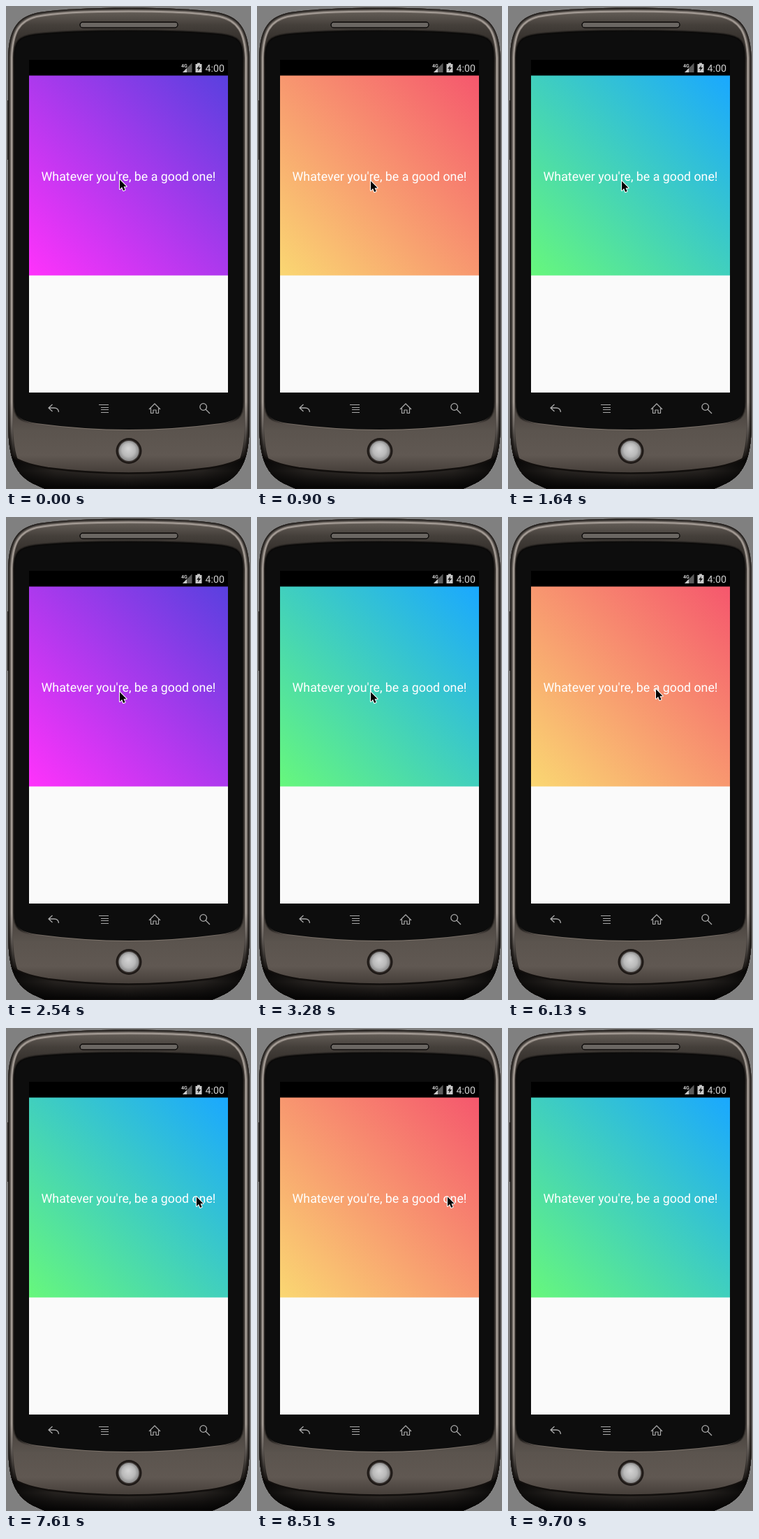
Recreate the animation shown at these times as an HTML page with a canvas. Size 351 by 691 pixels, loop 9990 ms.

```html
<!DOCTYPE html>
<html lang="en">
<head>
<meta charset="utf-8">
<title>Gradient tap</title>
<style>
  html, body { margin: 0; width: 100%; height: 100%; overflow: hidden; background: #808080; }
  canvas { display: block; width: 351px; height: 691px; }
</style>
</head>
<body>
<canvas id="stage" width="351" height="691"></canvas>
<script>
const W = 351, H = 691, LOOP = 9990;
const ctx = document.getElementById('stage').getContext('2d');

const palettes = {
  purple: ['#ff32fb', '#5940df'],
  green: ['#67f77c', '#1aa8ff'],
  orange: ['#fad772', '#f5576d']
};

// [start ms, palette]
const taps = [
  [0, 'purple'], [600, 'green'], [900, 'orange'], [1040, 'purple'], [1640, 'green'],
  [2090, 'orange'], [2240, 'green'], [2540, 'purple'], [3280, 'green'], [4480, 'purple'],
  [5680, 'green'], [5830, 'purple'], [6130, 'orange'], [6280, 'green'], [6430, 'purple'],
  [7610, 'green'], [8510, 'orange'], [8660, 'purple'], [8950, 'green']
];

// [start ms, tip x, tip y]
const pointer = [
  [0, 162, 247], [600, 162, 249], [4930, 162, 247], [5380, 162, 246], [5680, 168, 246],
  [5830, 190, 246], [6130, 211, 245], [6280, 224, 246], [6430, 237, 246], [6720, 247, 247],
  [6870, 258, 246], [7320, 272, 240], [8950, 274, 254], [9100, 281, 310], [9250, 294, 410],
  [9400, 308, 545], [9550, 319, 672], [9700, 400, 800]
];

const at = (track, t) => track.findLast(key => key[0] <= t);

function ramp(c, x0, y0, x1, y1, colors) {
  const g = c.createLinearGradient(x0, y0, x1, y1);
  colors.forEach((color, i) => Array.isArray(color)
    ? g.addColorStop(color[0], color[1])
    : g.addColorStop(i / (colors.length - 1), color));
  return g;
}

function stroke(c, path, color, width) {
  c.strokeStyle = color;
  c.lineWidth = width;
  c.stroke(new Path2D(path));
}

const BODY = 'M3 74C4 36 14 17 43 10C92 0 260 0 307 10C337 17 347 36 349 74' +
  'L349 600C348 645 340 672 306 686Q298 690 288 693L63 693Q53 690 45 686C11 672 4 645 3 600Z';
const GLASS = 'M13 74C13 52 18 45 42 42C105 35 246 35 309 42C333 45 338 52 338 74' +
  'L338 566C338 588 331 593 307 597Q240 606 176 606Q111 606 44 597C20 593 13 588 13 566Z';
const LIP = 'M0 636Q14 654 60 661Q176 676 291 661Q337 654 351 636V691H0Z';

function drawShell(c) {
  c.fillStyle = '#808080';
  c.fillRect(0, 0, W, H);
  c.fillStyle = '#252220';
  c.fillRect(2, 135, 3, 85);

  const body = new Path2D(BODY);
  c.save();
  c.clip(body);
  c.fillStyle = ramp(c, 0, 0, 0, H, [[0, '#6e6761'], [.02, '#5a544e'], [.04, '#443f3a'],
    [.065, '#37322e'], [.15, '#4b4540'], [.84, '#4b4540'], [.88, '#5b544e'],
    [.93, '#605852'], [.965, '#463f3a']]);
  c.fillRect(0, 0, W, H);

  // Rounded metal edge, painted from the inside out.
  const rim = ['#24211f', '#34302d', '#4b4642', '#6f6862', '#9a928c', '#aaa29b', '#7c746e'];
  for (let i = rim.length; i > 0; i--) {
    const color = rim[i - 1];
    stroke(c, BODY, ramp(c, 0, 0, 0, H, [[0, color], [.82, color], [.94, '#14110f']]), i * 2);
  }

  const lip = new Path2D(LIP);
  c.fillStyle = ramp(c, 0, 640, 0, 690, ['#14110f', '#2b2724', '#37322e', '#1c1917', '#070606']);
  c.fill(lip);
  c.fillStyle = ramp(c, 0, 0, W, 0, [[0, '#000d'], [.2, '#0005'], [.5, '#0000'], [.8, '#0005'], [1, '#000d']]);
  c.fill(lip);
  stroke(c, LIP, '#120f0d', 2.5);
  c.restore();

  [[7, '#0003'], [5, '#0006'], [3, '#000a']].forEach(([width, color]) => {
    stroke(c, GLASS, ramp(c, 0, 590, 0, 598, [color, '#0000']), width);
  });
  stroke(c, GLASS, ramp(c, 0, 585, 0, 606, ['#83797000', '#837970']), 2);
  c.fillStyle = '#0d0d0d';
  c.fill(new Path2D(GLASS));
}

function drawSpeaker(c) {
  c.save();
  c.beginPath();
  c.roundRect(106, 23, 140, 8, 4);
  c.fillStyle = '#3b3835';
  c.fill();
  c.save();
  c.clip();
  c.fillStyle = '#99948f';
  for (let y = 24; y < 31; y++) {
    for (let x = 107 + y % 2; x < 246; x += 2) c.fillRect(x, y, 1, 1);
  }
  c.restore();
  c.strokeStyle = '#100e0d';
  c.lineWidth = 1.5;
  c.stroke();
  c.restore();
}

function drawBall(c) {
  const disc = (r, fill) => {
    c.beginPath();
    c.arc(176, 636.5, r, 0, Math.PI * 2);
    c.fillStyle = fill;
    c.fill();
  };
  disc(18.5, '#1e1916');
  disc(16, '#393330');
  const shine = c.createRadialGradient(175, 633, 1, 176, 636.5, 15);
  shine.addColorStop(0, '#d2d2d2');
  shine.addColorStop(.6, '#b9b9b9');
  shine.addColorStop(1, '#858585');
  disc(14.5, shine);
}

function drawKeys(c) {
  const ink = '#a9a9a9';
  c.lineJoin = 'round';
  stroke(c, 'M66.5 570L61 575L66.5 580M61 575H69Q75 575 75.5 581', ink, 1.3);
  stroke(c, 'M133 570.5H147M136 574.5H147M136 577.5H147M136 581.5H147', ink, 1.2);
  stroke(c, 'M205 577L213 569L221 577M207.5 575.5V582.5H211V578H215V582.5H218.5V575.5', ink, 1.2);
  stroke(c, 'M287.5 573.5A4.8 4.8 0 1 1 277.9 573.5A4.8 4.8 0 1 1 287.5 573.5M286 577L292 583', ink, 1.3);
}

function drawStatus(c) {
  c.fillStyle = '#000';
  c.fillRect(33, 77, 285, 23);
  c.fillStyle = '#c9c9c9';
  c.font = 'bold 7px Roboto, sans-serif';
  c.fillText('4G', 251, 88);
  c.fillStyle = '#5b5b5b';
  c.fill(new Path2D('M253 95L266.5 81.5V95Z'));
  c.fillStyle = '#c9c9c9';
  c.fill(new Path2D('M253 95L259 89V95Z'));
  c.fill(new Path2D('M271.5 83H274V81.5H278V83H280.5V95H271.5Z'));
  c.fillStyle = '#111';
  c.fill(new Path2D('M277.3 84.5L273.2 89.8H275.7L274.7 93.5L279 88H276.3Z'));
  c.fillStyle = '#cfcfcf';
  c.font = '14.2px Roboto, sans-serif';
  c.fillText('4:00', 285.6, 94);
}

const shell = document.createElement('canvas');
shell.width = W;
shell.height = H;
const shellCtx = shell.getContext('2d');
ctx.textRendering = shellCtx.textRendering = 'geometricPrecision';
[drawShell, drawSpeaker, drawBall, drawKeys, drawStatus].forEach(draw => draw(shellCtx));
shellCtx.fillStyle = '#fafafa';
shellCtx.fillRect(33, 385, 285, 168);

const ARROW = new Path2D('M0 0V13.5L3.1 10.6L5.2 15.6L7.6 14.6L5.5 9.8H9.6Z');

function drawPointer(x, y) {
  ctx.save();
  ctx.translate(x + 1, y + 1.5);
  ctx.lineJoin = 'round';
  ctx.lineWidth = 2;
  ctx.strokeStyle = '#fff';
  ctx.stroke(ARROW);
  ctx.fillStyle = '#000';
  ctx.fill(ARROW);
  ctx.restore();
}

function render(t) {
  ctx.drawImage(shell, 0, 0);
  ctx.fillStyle = ramp(ctx, 33, 385, 318, 100, palettes[at(taps, t)[1]]);
  ctx.fillRect(33, 99.5, 285, 286);
  ctx.fillStyle = '#fff';
  ctx.font = '17.8px Roboto, sans-serif';
  ctx.textAlign = 'center';
  ctx.fillText("Whatever you're, be a good one!", 175.5, 249.5);
  const [, x, y] = at(pointer, t);
  drawPointer(x, y);
}

const start = performance.now();
function tick() {
  render((performance.now() - start) % LOOP);
  requestAnimationFrame(tick);
}
tick();
</script>
</body>
</html>
```
